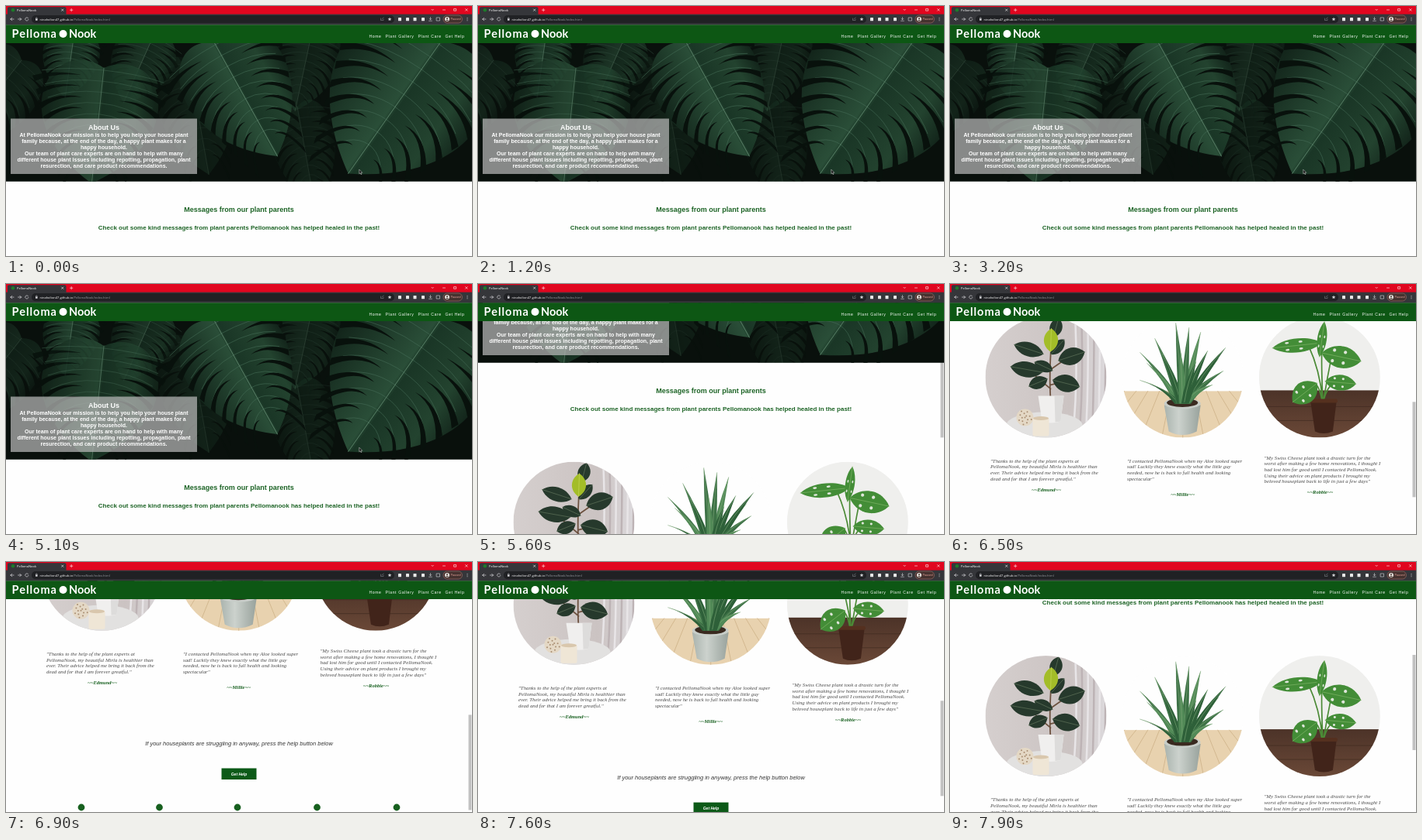
Recreate the animation shown at these times as an HTML page. Size 600 by 323 pixels, loop 8000 ms.

```html
<!DOCTYPE html>
<html lang="en">
<head>
<meta charset="utf-8">
<title>PellomaNook</title>
<style>
html, body { margin: 0; width: 100%; height: 100%; overflow: hidden; background: #fff; }
svg { display: block; width: 100vw; height: 100vh; }
text { font-family: "Liberation Sans", Arial, sans-serif; white-space: pre; }
.mid { text-anchor: middle; }
.bold { font-weight: 700; }
.green { fill: #1c6325; }
.nav { font-size: 5.1px; letter-spacing: .6px; fill: #fff; }
.brand { font: 700 14.5px Lato, sans-serif; fill: #fff; }
.quote { font: italic 6.8px "Liberation Serif", serif; fill: #4a4a4a; }
.name { font: italic 700 6.5px "Liberation Serif", serif; fill: #17601f; text-anchor: middle; }
.ui { font: 500 4px "Open Sans", sans-serif; }
</style>
</head>
<body>
<svg viewBox="0 0 600 323" preserveAspectRatio="none">
  <defs>
    <clipPath id="round"><circle r="78"/></clipPath>
    <clipPath id="heroBox"><rect y="48" width="600" height="178.7"/></clipPath>
    <linearGradient id="leaf"><stop stop-color="#12241a"/><stop offset=".3" stop-color="#213f2d"/><stop offset=".48" stop-color="#2a4e38"/><stop offset=".52" stop-color="#1a3626"/><stop offset=".8" stop-color="#23432f"/><stop offset="1" stop-color="#12241a"/></linearGradient>
    <linearGradient id="wall"><stop stop-color="#d5cfce"/><stop offset=".7" stop-color="#cbc3c2"/><stop offset="1" stop-color="#dcd9dc"/></linearGradient>
    <linearGradient id="wood" x2="0" y2="1"><stop stop-color="#4c3328"/><stop offset="1" stop-color="#6a4837"/></linearGradient>
    <linearGradient id="pot"><stop stop-color="#a9b3ad"/><stop offset=".4" stop-color="#ccd2cd"/><stop offset="1" stop-color="#98a29c"/></linearGradient>
  </defs>
  <rect width="600" height="323" fill="#fefefe"/>
  <rect id="thumb" x="595.5" width="4" height="123" fill="#c1c1c1"/>
  <g id="page"></g>
  <g id="bar"></g>
  <path id="cursor" d="M454.8 211.2v5.6l1.3-1.1 1 2 .9-.4-.9-2h1.7z" fill="#111" stroke="#ddd" stroke-width=".5"/>
</svg>
<script>
const $ = id => document.getElementById(id);
const text = (x, y, s, cls, more = '') => `<text x="${x}" y="${y}" class="${cls}" ${more}>${s}</text>`;
const rect = (x, y, w, h, fill, more = '') => `<rect x="${x}" y="${y}" width="${w}" height="${h}" fill="${fill}" ${more}/>`;
const dot = (x, y, r, fill, more = '') => `<circle cx="${x}" cy="${y}" r="${r}" fill="${fill}" ${more}/>`;
const path = (d, fill, more = '') => `<path d="${d}" fill="${fill}" ${more}/>`;
const line = (d, color, w = 1) => path(d, 'none', `stroke="${color}" stroke-width="${w}" stroke-linecap="round"`);
const place = (x, y, turn, body) => `<g transform="translate(${x} ${y}) rotate(${turn})">${body}</g>`;
const size = px => `font-size="${px}"`;

// Large split leaf hanging from its base: heart outline, ribs, and slits between the fingers
function bigLeaf(x, y, turn, len, half, opacity = 1) {
  const side = d => `C${d * half * .9} ${-len * .25} ${d * half * 1.75} ${len * .5} 0 ${len}`;
  let s = path(`M0 0${side(1)}M0 0${side(-1)}`, 'url(#leaf)');
  for (let i = 0; i < 9; i++) {
    const t = .02 + i * .095, y0 = len * t;
    const reach = half * (1.08 - .8 * t), drop = len * (.05 + .2 * t);
    for (const d of [-1, 1]) {
      const ex = d * reach, ey = y0 + drop;
      s += line(`M0 ${y0}Q${ex * .6} ${y0} ${ex} ${ey}`, '#48705a', .5);
      s += path(`M${ex * .35} ${y0 + len * .06}Q${ex * .8} ${y0 + len * .06} ${ex * 1.1} ${ey + len * .1}L${ex * 1.15} ${ey + len * .055}Q${ex * .8} ${y0 + len * .035} ${ex * .35} ${y0 + len * .06}`, '#08110c');
    }
  }
  s += line(`M0 0V${len}`, '#587f66', .9);
  return `<g opacity="${opacity}">${place(x, y, turn, s)}</g>`;
}

function hero() {
  const leaves =
    bigLeaf(20, 70, 38, 140, 50, .4) + bigLeaf(235, 70, -10, 150, 50, .3) +
    bigLeaf(395, 28, 12, 110, 42, .4) + bigLeaf(465, 20, -6, 90, 40, .35) +
    bigLeaf(88, 34, 8, 85, 36, .8) + bigLeaf(190, 38, 24, 95, 40, .6) +
    bigLeaf(375, 130, -10, 130, 40, .3) + bigLeaf(126, 80, 6, 150, 74, .85) +
    bigLeaf(268, 47, -29, 168, 68) + bigLeaf(560, 46, 35, 208, 100);
  const copy = [
    'At PellomaNook our mission is to help you help your house plant',
    'family because, at the end of the day, a happy plant makes for a',
    'happy household.',
    'Our team of plant care experts are on hand to help with many',
    'different house plant issues including repotting, propagation, plant',
    'resurection, and care product recommendations.'];
  return `<g clip-path="url(#heroBox)">${rect(0, 48, 600, 179, '#09100c')}${leaves}</g>` +
    rect(6, 145.5, 240, 71.5, '#bdbdbd', 'opacity=".7"') +
    text(126, 160, 'About Us', 'mid bold', size(9) + ' fill="#fff"') +
    copy.map((s, i) => text(126, 168.5 + i * 8.05, s, 'mid bold', size(7) + ' fill="#fff"')).join('');
}

// Small leaf: pointed oval with a midrib
function leaf(x, y, turn, a, b, fill, rib) {
  return place(x, y, turn, path(`M${-a} 0C${-a * .5} ${-b * 1.35} ${a * .5} ${-b * 1.35} ${a} 0C${a * .5} ${b * 1.35} ${-a * .5} ${b * 1.35} ${-a} 0`, fill) +
    line(`M${-a} 0H${a}`, rib, .6));
}

function rubberPlant() {
  const dark = (x, y, turn, a, b) => leaf(x, y, turn, a, b, '#26392c', '#65795f');
  let s = rect(-78, -78, 156, 156, 'url(#wall)');
  for (let i = 0; i < 6; i++) s += line(`M${38 + i * 8} -70Q${41 + i * 7} 0 ${36 + i * 8} 62`, i % 2 ? '#bdb3b5' : '#e8e5e7', 2.5);
  s += `<ellipse cx="-2" cy="62" rx="49" ry="17" fill="#e2e1e0"/>` +
    line('M6 28Q4 0 7 -45M6 15Q-12 0 -24 -11M6 10L22 6M6 -10L26 -24', '#6d5240', 1.8) +
    dark(13, -64, -75, 13, 8) + dark(-22, -36, 18, 20, 9) + dark(33, -27, -18, 18, 11) +
    dark(-25, -10, 10, 21, 10) + dark(-3, -14, 25, 13, 7) + dark(-10, 7, -22, 13, 8) +
    dark(26, 8, 14, 18, 11) + dark(15, -39, -48, 13, 7) +
    leaf(6.5, -48, -88, 15, 9, '#a3bd28', '#cbd964') +
    path('M-10 24H23L19 57Q6 61 -5 57Z', '#f0efee') + path('M11 24H23L19 57L12 58Z', '#dddcdb') +
    dot(-27, 52, 11, '#e4d8c5');
  for (let i = 0; i < 14; i++) s += dot(-27 + Math.sin(i * 2.4) * 2.6 * Math.sqrt(i), 52 + Math.cos(i * 2.4) * 2.6 * Math.sqrt(i), 1, '#a98e72');
  return s + rect(-17, 52, 21, 24, '#efe6d6', 'rx="2"') + `<ellipse cx="-6.5" cy="53" rx="10" ry="2.5" fill="#d9c7ad"/>`;
}

function aloe() {
  let s = rect(-78, -78, 156, 156, '#fefefe') + rect(-78, 18, 156, 60, '#e8d2af');
  for (let i = -5; i < 6; i++) s += line(`M${i * 15} 18L${i * 27} 78`, '#c9ad82', .7);
  s += path('M-24 36H23L18 70Q0 79 -18 70Z', 'url(#pot)') +
    `<ellipse cx="-.5" cy="34" rx="23.5" ry="7" fill="#c7cdc8"/><ellipse cx="-.5" cy="33" rx="20" ry="5.5" fill="#3a2a20"/>`;
  const tips = [[-55, -32], [-46, -18], [-55, 4], [-36, -50], [46, -24], [55, -38], [52, -8], [38, 10], [-26, -30], [-9, -70], [23, -58], [32, -34], [8, -64], [-3, -34], [17, -20]];
  tips.forEach(([x, y], i) => {
    const bx = x * .12, cx = x * .38, cy = y * .35 + 12;
    s += path(`M${bx - 4} 34Q${cx - 5} ${cy} ${x} ${y}Q${cx + 6} ${cy + 3} ${bx + 4} 34Z`, ['#3d7146', '#528a57', '#2e6039'][i % 3]) +
      line(`M${bx} 32Q${cx} ${cy} ${x} ${y}`, '#80a97a', .6);
  });
  return s;
}

function cheesePlant() {
  let s = rect(-78, -78, 156, 156, '#efefed') + rect(-78, 17, 156, 61, 'url(#wood)');
  s += line('M-70 38H70M-60 56H60', '#3f2a20', .7) +
    line('M4 30Q0 -10 -14 -40M4 30Q2 -20 3 -36M5 30Q10 0 16 -30M5 30Q10 12 18 7M3 30Q-1 8 -8 8', '#4b8a36', 1.7) +
    path('M-12 29H22L17 70Q5 75 -6 70Z', '#41241a') + rect(-13, 28, 36, 5, '#55301f', 'rx="2"');
  const parts = [[-29, -41, -6, 32, 9], [28, -26, 12, 26, 14], [3, -49, -82, 23, 6], [-19, 20, -38, 20, 14], [27, 7, 5, 20, 10]];
  for (const [x, y, turn, a, b] of parts) {
    s += leaf(x, y, turn, a, b, '#438d37', '#86b86d');
    let holes = '';
    for (const k of [-.4, .15]) for (const d of [-1, 1])
      holes += `<ellipse cx="${k * a}" cy="${d * b * .5}" rx="${a * .08}" ry="${b * .15}" fill="#dfe6da"/>`;
    s += place(x, y, turn, holes);
  }
  return s;
}

const quotes = [
  [52, 541, 124, 580, '~~Edmund~~', ['"Thanks to the help of the plant experts at', 'PellomaNook, my beautiful Mirla is healthier than', 'ever. Their advice helped me bring it back from the', 'dead and for that I am forever greatful."']],
  [228, 541, 299.5, 586, '~~Millie~~', ['"I contacted PellomaNook when my Aloe looked super', 'sad! Luckily they knew exactly what the little guy', 'needed, now he is back to full health and looking', 'spectacular"']],
  [404.5, 537, 476.5, 583.5, '~~Robbie~~', ['"My Swiss Cheese plant took a drastic turn for the', 'worst after making a few home renovations, I thought I', 'had lost him for good until I contacted PellomaNook.', 'Using their advice on plant products I brought my', 'beloved houseplant back to life in just a few days"']]
];

function buildPage() {
  let s = hero() +
    text(300, 266.1, 'Messages from our plant parents', 'mid bold green', size(9)) +
    text(300, 288.6, 'Check out some kind messages from plant parents Pellomanook has helped healed in the past!', 'mid bold green', size(8));
  [rubberPlant, aloe, cheesePlant].forEach((draw, i) => {
    s += `<g transform="translate(${123.5 + i * 176.2} 432.7)"><g clip-path="url(#round)">${draw()}</g></g>`;
  });
  for (const [x, y, nx, ny, name, rows] of quotes) {
    rows.forEach((row, i) => s += text(x, y + 1.9 + i * 7.7, row, 'quote'));
    s += text(nx, ny, name, 'name');
  }
  s += text(300, 658.6, 'If your houseplants are struggling in anyway, press the help button below', 'mid', size(7.5) + ' font-style="italic" fill="#333"') +
    rect(277.5, 688.5, 45, 14.5, '#0d5a18') +
    text(300, 697.5, 'Get Help', 'mid bold', size(5) + ' font-style="italic" fill="#fff"');
  for (const x of [97, 197.5, 298, 400.5, 503]) s += dot(x, 739, 4.4, '#17601f');
  return s;
}

function buildBar() {
  const ink = '#d4d5d8';
  let s = rect(0, 0, 600, 11, '#e1061f') + rect(0, 10.6, 600, 14, '#35363a') +
    path('M2 11V3Q2 1.2 4 1.2H75.5Q77.5 1.2 77.5 3V11Z', '#35363a') +
    rect(33, 12, 467, 10.2, '#202124', 'rx="5"') +
    dot(9, 5.3, 2.3, '#1d7a2a') + text(14, 6.7, 'PellomaNook', 'ui', 'fill="#fff"') +
    line('M71.5 4l2.4 2.4m0-2.4l-2.4 2.4M82.5 5.2h3.4m-1.7-1.7v3.4', '#fff', .6) +
    line('M548 4.3l1.2 1.2 1.2-1.2M562.5 5h3M577 3.6h2.6v2.6h-2.6zM591.5 3.6l2.6 2.6m0-2.6l-2.6 2.6', '#fff', .6) +
    line('M6 17h4m-4 0l1.8-1.8M6 17l1.8 1.8M15.5 17h4m0 0l-1.8-1.8m1.8 1.8l-1.8 1.8M28.6 15.7a2.1 2.1 0 1 0 .3 1.8', ink, .7) +
    rect(38, 16.4, 2.6, 2.3, ink) + line('M38.5 16.4v-.8a.8.8 0 0 1 1.6 0v.8', ink, .5) +
    `<text x="43.5" y="18.6" class="ui" fill="#fff">ninaholton47.github.io<tspan fill="#96999e">/PellomaNook/index.html</tspan></text>` +
    line('M482.5 16v2.5h3.5v-1.5M484 16.8l2.2-1.8', '#8e9196', .5) +
    path('M494 14.6l.7 1.6 1.7.1-1.3 1.1.4 1.7-1.5-.9-1.5.9.4-1.7-1.3-1.1 1.7-.1z', ink);
  for (const x of [507, 517, 526.5, 537]) s += rect(x - 2, 14.9, 4, 4.4, '#e8e8e8', 'rx=".6"');
  s += line('M546.5 14.6v3m-1.4-1.3l1.4 1.4 1.4-1.4M544.6 19.2h3.8M554.5 15h4v4h-4z', ink, .6) +
    rect(563, 12, 24.5, 10, '#45322f', 'rx="5" stroke="#d98f86" stroke-width=".4"') +
    dot(568, 17, 3, '#e9e4e0') + dot(568, 16, 1.1, '#55443e') + path('M566 19.2q2-3.6 4 0z', '#55443e') +
    text(572.5, 18.4, 'Paused', 'ui', 'fill="#f2aaa1" style="font-size:3.8px"');
  for (const y of [15.2, 17, 18.8]) s += dot(594, y, .5, ink);
  s += rect(0, 24.3, 600, 23.7, '#0d5714') + text(7.5, 40.8, 'Pelloma', 'brand', 'letter-spacing="1"') +
    dot(73.5, 36, 5, '#fff') + text(81, 40.8, 'Nook', 'brand');
  [[467.5, 'Home'], [488.5, 'Plant Gallery'], [530.5, 'Plant Care'], [565.5, 'Get Help']]
    .forEach(([x, label]) => s += text(x, 40.8, label, 'nav'));
  return s;
}

const stops = [[5100, 0], [5600, 125], [6200, 230], [6900, 422], [7100, 426], [7500, 426], [7900, 233.6]];
function scrollAt(t) {
  if (t <= stops[0][0]) return 0;
  const i = stops.findIndex(p => p[0] >= t);
  const [t0, a] = stops[i - 1], [t1, b] = stops[i];
  return a + (b - a) * (t - t0) / (t1 - t0);
}

// The picture steps ten times a second
function render(now) {
  const t = Math.floor(now % 8000 / 100) * 100;
  const s = scrollAt(t);
  $('page').setAttribute('transform', `translate(0 ${-s})`);
  $('thumb').setAttribute('y', 24 + s * .411);
  $('cursor').style.display = s ? 'none' : '';
}

$('page').innerHTML = buildPage();
$('bar').innerHTML = buildBar();
const start = performance.now();
function tick() {
  render(performance.now() - start);
  requestAnimationFrame(tick);
}
tick();
</script>
</body>
</html>
```
